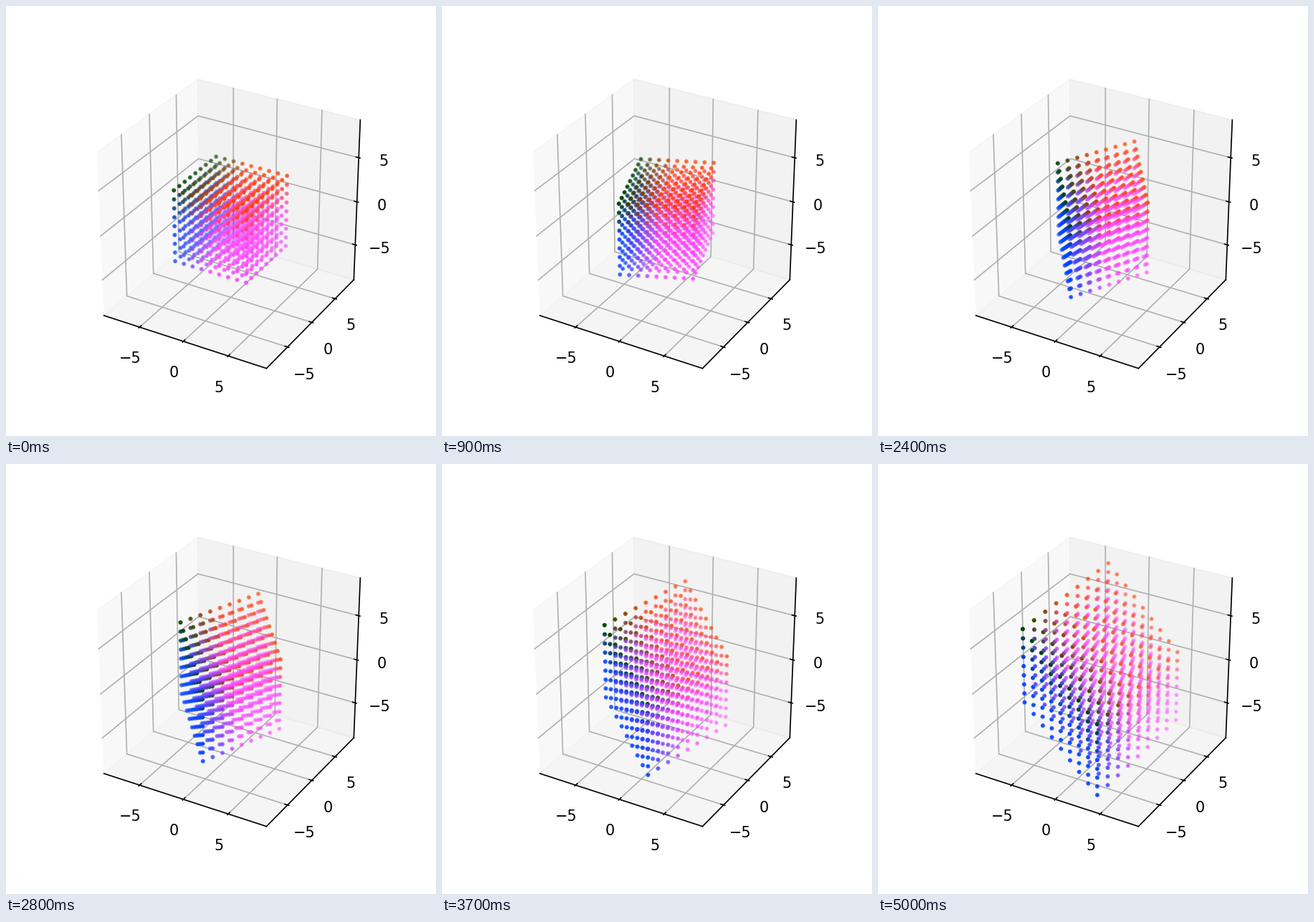
A matplotlib script for the animation above (5100 ms loop, 600 px wide and 600 px high).

```python
import itertools

import matplotlib.pyplot as plt
import numpy as np
from matplotlib.animation import FuncAnimation
from matplotlib.patches import Polygon

plt.rcParams["font.family"] = "DejaVu Sans"

SIZE, DPI = 600, 150
FRAMES, INTERVAL = 51, 100
LIMIT = 8.8                  # half range of each axis
WALL = LIMIT * 25 / 24       # the panes sit slightly outside the range
STEP = 2 * LIMIT / 12
LABEL = WALL + 1.2405 * STEP
TICKS = (-5, 0, 5)

# Camera at elevation 30, azimuth -60, ten box widths away
ELEV, AZIM, DIST = np.radians(30), np.radians(-60), 10
RIGHT = np.array([-np.sin(AZIM), np.cos(AZIM), 0])
UP = np.array([-np.sin(ELEV) * np.cos(AZIM), -np.sin(ELEV) * np.sin(AZIM), np.cos(ELEV)])
TOWARD = np.array([np.cos(ELEV) * np.cos(AZIM), np.cos(ELEV) * np.sin(AZIM), np.sin(ELEV)])
SCALE = np.array([465, -462]) / 0.185
CENTER = np.array([75 + 465 * 0.095 / 0.185, 534 - 462 * 0.095 / 0.185])


def project(points):
    """Return stage pixels and camera distance of an (n, 3) array."""
    unit = np.asarray(points, float) / (2 * LIMIT)
    dist = DIST - unit @ TOWARD
    flat = np.column_stack([unit @ RIGHT, unit @ UP]) / dist[:, None]
    return CENTER + flat * SCALE, dist


fig = plt.figure(figsize=(SIZE / DPI, SIZE / DPI), dpi=DPI, facecolor="white")
ax = fig.add_axes([0, 0, 1, 1])
ax.set_xlim(0, SIZE)
ax.set_ylim(SIZE, 0)
ax.axis("off")


def draw_line(points, color, z):
    xy, _ = project(points)
    ax.plot(xy[:, 0], xy[:, 1], color=color, lw=0.8, zorder=z)


def draw_pane(points, shade):
    xy, _ = project(points)
    ax.add_patch(Polygon(xy, closed=False, facecolor=(shade,) * 3,
                         edgecolor=(shade,) * 3, alpha=0.5, lw=1, zorder=1))


def draw_label(point, value):
    (x, y), = project([point])[0]
    ax.text(x, y, str(value).replace("-", "\u2212"), fontsize=10,
            ha="center", va="top", zorder=3)


def draw_box():
    w = WALL
    draw_pane([(-w, -w, -w), (-w, w, -w), (-w, w, w), (-w, -w, w)], 0.95)
    draw_pane([(-w, w, -w), (w, w, -w), (w, w, w), (-w, w, w)], 0.90)
    draw_pane([(-w, -w, -w), (w, -w, -w), (w, w, -w), (-w, w, -w)], 0.925)

    grid = "#b0b0b0"
    for t in TICKS:
        draw_line([(t, -w, -w), (t, w, -w), (t, w, w)], grid, 2)
        draw_line([(w, t, -w), (-w, t, -w), (-w, t, w)], grid, 2)
        draw_line([(-w, -w, t), (-w, w, t), (w, w, t)], grid, 2)

    draw_line([(-w, -w, -w), (w, -w, -w)], "black", 3)
    draw_line([(w, -w, -w), (w, w, -w)], "black", 3)
    draw_line([(w, w, -w), (w, w, w)], "black", 3)

    out, inner = w + 0.1 * STEP, w - 0.2 * STEP
    for t in TICKS:
        draw_line([(t, -out, -w), (t, -inner, -w)], "black", 3)
        draw_line([(out, t, -w), (inner, t, -w)], "black", 3)
        draw_line([(out, w, t), (inner, w, t)], "black", 3)
        draw_label((t, -LABEL, -LABEL), t)
        draw_label((LABEL, t, -LABEL), t)
        draw_label((LABEL, LABEL, t), t)


draw_box()

lattice = np.array(list(itertools.product(range(-4, 5), repeat=3)), float)
colors = np.column_stack([
    np.minimum(1, 1 + lattice[:, 0] / 4),
    np.full(len(lattice), 0.25),
    np.minimum(1, 1 - lattice[:, 2] / 4),
    np.ones(len(lattice)),
])
matrix = np.array([[0, -1, 0],
                   [2, 0, 0],
                   [0, 1, 1]])

dots = ax.scatter(lattice[:, 0], lattice[:, 1], s=2, c=colors,
                  edgecolors="face", linewidths=1.5, zorder=4)


def update(frame):
    t = frame / (FRAMES - 1)
    blend = (1 - t) * np.eye(3) + t * matrix
    xy, dist = project(lattice @ blend.T)
    # Far dots fade
    depth = -1 / dist
    fade = (depth - depth.min()) / np.ptp(depth)
    rgba = colors.copy()
    rgba[:, 3] = 1 - 0.7 * fade
    dots.set_offsets(xy)
    dots.set_facecolor(rgba)
    return (dots,)


anim = FuncAnimation(fig, update, frames=FRAMES, interval=INTERVAL,
                     init_func=lambda: update(0), repeat=True, repeat_delay=0)
plt.show()
```
